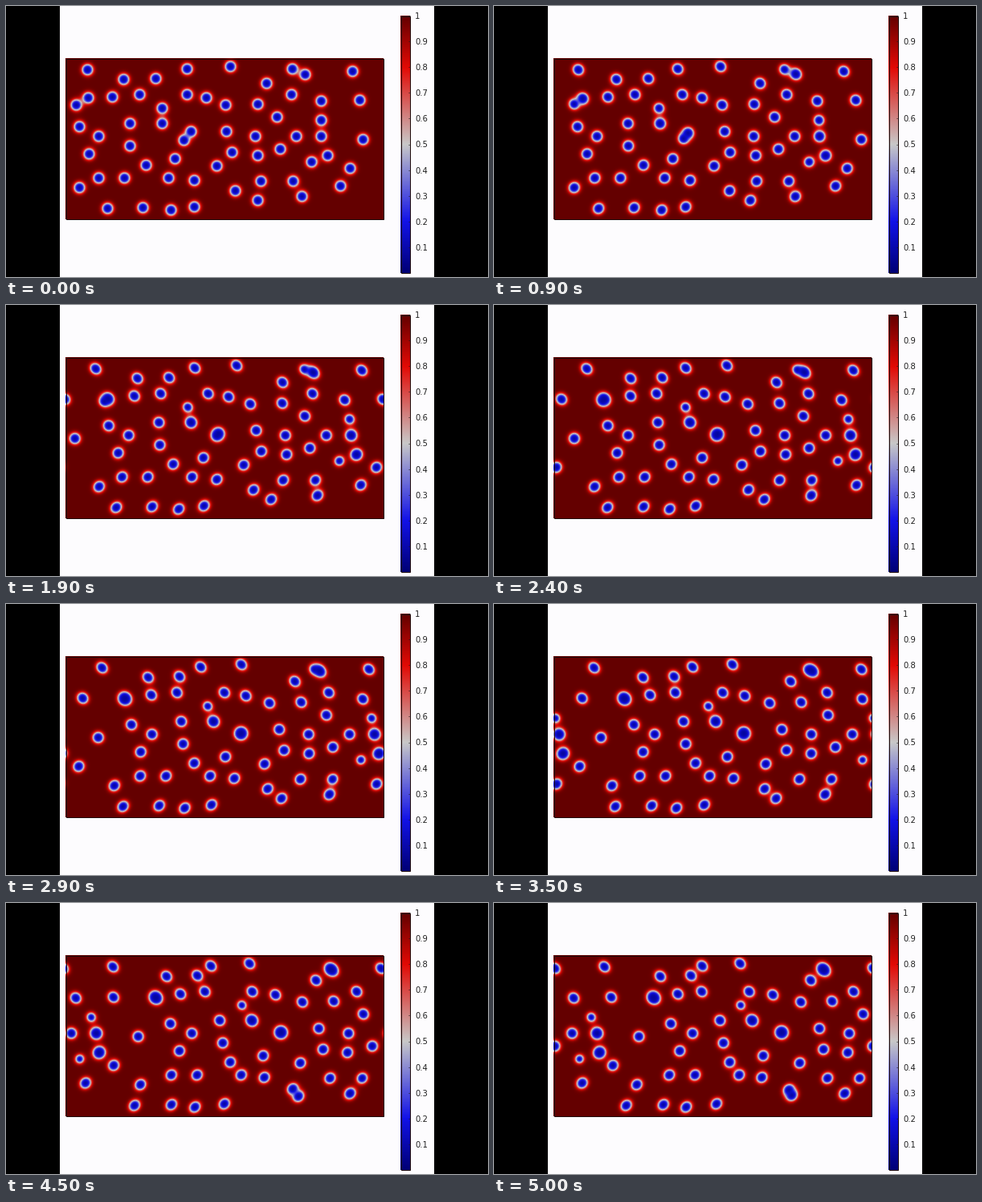
These frames come from a looping animation (600x338 px, 5.1 s). A matplotlib script:

```python
import numpy as np
import matplotlib.pyplot as plt
from matplotlib.animation import FuncAnimation
from matplotlib.colors import LinearSegmentedColormap
from matplotlib.patches import Rectangle

W, H = 600, 338
FRAMES, INTERVAL = 51, 100
LEFT, RIGHT, TOP, BOTTOM = 74, 470, 65, 266
NX, NY = RIGHT - LEFT, BOTTOM - TOP
MID, HALF = 166, 102        # axis and half width of the channel flow
RADIUS, EDGE, BLEND = 6.4, 3.0, 2.8
NEAR, CONTACT = 23, 18      # distances for exchange and for merging
REACH = 23                  # half size of the patch drawn per drop

WAVE = [(0.0, (0, 0, 118)), (0.2, (18, 18, 232)), (0.5, (200, 200, 200)),
        (0.8, (226, 10, 5)), (1.0, (100, 0, 0))]
cmap = LinearSegmentedColormap.from_list(
    "wave", [(v, tuple(c / 255 for c in rgb)) for v, rgb in WAVE], N=512)

# starting centres; all later states follow from these
SEEDS = np.array([
    (101, 79), (146, 91), (186, 90), (225, 78), (279, 75), (356, 78),
    (372, 85), (431, 81), (102, 114), (87, 123), (132, 113), (166, 110),
    (194, 127), (194, 146), (225, 110), (249, 114), (273, 123), (324, 96),
    (355, 110), (313, 122), (337, 138), (392, 118), (440, 117), (392, 142),
    (392, 162), (444, 166), (91, 150), (115, 162), (154, 146), (154, 174),
    (103, 184), (174, 198), (115, 214), (147, 214), (91, 226), (126, 252),
    (170, 251), (205, 254), (234, 250), (202, 214), (234, 217), (210, 190),
    (221, 167), (230, 156), (274, 156), (281, 182), (262, 199), (310, 162),
    (313, 186), (341, 178), (361, 162), (380, 194), (400, 186), (428, 202),
    (416, 224), (317, 218), (357, 218), (368, 237), (313, 242), (285, 230),
], dtype=float)


def travel(t):
    """Distance covered on the axis while the flow spins up."""
    return 0.987 * (32.5 * t - 29.15 * (1 - np.exp(-t / 1.1)))


def profile(y):
    return 1 - ((y - MID) / HALF) ** 2


def offsets(pos):
    """Vectors from each drop to every other, periodic in x, and lengths."""
    gap = pos[None] - pos[:, None]
    gap[..., 0] -= NX * np.round(gap[..., 0] / NX)
    return gap, np.hypot(gap[..., 0], gap[..., 1])


def exchange_bias():
    """In a close pair the leading, faster drop feeds on the other."""
    _, dist = offsets(SEEDS)
    lead = SEEDS[:, 0] - 0.5 * abs(SEEDS[:, 1] - MID)
    gain = np.tanh((lead[:, None] - lead[None]) / 8)
    return np.where((dist > 0) & (dist < NEAR), gain, 0).sum(axis=1)


def simulate():
    """Centres and radii for every frame."""
    pos, bias, dt = SEEDS.copy(), exchange_bias(), INTERVAL / 1000
    states = []
    for n in range(FRAMES):
        t = n * dt
        area = 1 + 0.55 * bias * (1 - np.exp(-t / 2.5))
        states.append((pos.copy(), RADIUS * np.sqrt(area)))
        gap, dist = offsets(pos)
        pull = np.where(dist < CONTACT, 1.15 - dist / CONTACT, 0)
        share = area[None] / (area[None] + area[:, None])
        pos += dt * ((pull * share)[..., None] * gap).sum(axis=1)
        pos[:, 0] += (travel(t + dt) - travel(t)) * profile(pos[:, 1])
    return states


def field(n):
    """Phase field: near 0 inside drops, 1 outside."""
    centres, radii = STATES[n]
    spin_up = min(n * INTERVAL / 2000, 1)
    total = np.full((NY, NX), 1e-9)
    for (x, y), r in zip(centres, radii):
        cx, cy = int(x) - LEFT, int(y) - TOP
        cols = np.arange(cx - REACH, cx + REACH + 1)
        rows = np.arange(max(cy - REACH, 0), min(cy + REACH + 1, NY))
        dx = cols[None, :] + LEFT - x
        dy = rows[:, None] + TOP - y
        tilt = 0.17 * (MID - y) / HALF * (r / RADIUS) ** 2 * spin_up
        dist = np.sqrt(dx ** 2 + dy ** 2 - 2 * tilt * dx * dy) - r
        total[np.ix_(rows, cols % NX)] += np.exp(-dist / BLEND)
    return 0.07 + 0.93 / (1 + total ** (2 * BLEND / EDGE))


STATES = simulate()

fig = plt.figure(figsize=(W / 100, H / 100), dpi=100, facecolor="black")
ax = fig.add_axes([0, 0, 1, 1])
ax.axis("off")


def outline(x, y, w, h):
    """One-pixel frame inside the given box."""
    ax.add_patch(Rectangle((x + 0.5, y + 0.5), w - 1, h - 1, fill=False,
                           ec="#200c0c", lw=0.72, joinstyle="miter",
                           zorder=4))


ax.add_patch(Rectangle((67, 0), 466, H, fc="#fdfcfe", lw=0))
picture = ax.imshow(field(0), cmap=cmap, vmin=0, vmax=1, zorder=2,
                    interpolation="nearest",
                    extent=(LEFT, RIGHT, BOTTOM, TOP))
outline(LEFT, TOP, NX, NY)

BAR_X, BAR_W, BAR_TOP, BAR_LEN = 491, 12, 12, 321
ax.imshow(np.linspace(1, 0, BAR_LEN)[:, None], cmap=cmap, vmin=0, vmax=1,
          zorder=2, extent=(BAR_X, BAR_X + BAR_W, BAR_TOP + BAR_LEN, BAR_TOP))
outline(BAR_X, BAR_TOP, BAR_W, BAR_LEN)
for n in range(1, 11):
    y = BAR_TOP + BAR_LEN * (1 - n / 10)
    ax.plot([500.5, 502.5], [y, y], color="#202020", lw=0.4, zorder=5)
    ax.text(509, y, f"{n / 10:g}", family="DejaVu Sans", size=7.2,
            color="#202020", ha="left", va="center_baseline")

ax.set_xlim(0, W)
ax.set_ylim(H, 0)
ax.set_aspect("auto")


def update(n):
    picture.set_data(field(n))
    return [picture]


anim = FuncAnimation(fig, update, frames=FRAMES, interval=INTERVAL,
                     repeat=True, repeat_delay=0)
plt.show()
```
